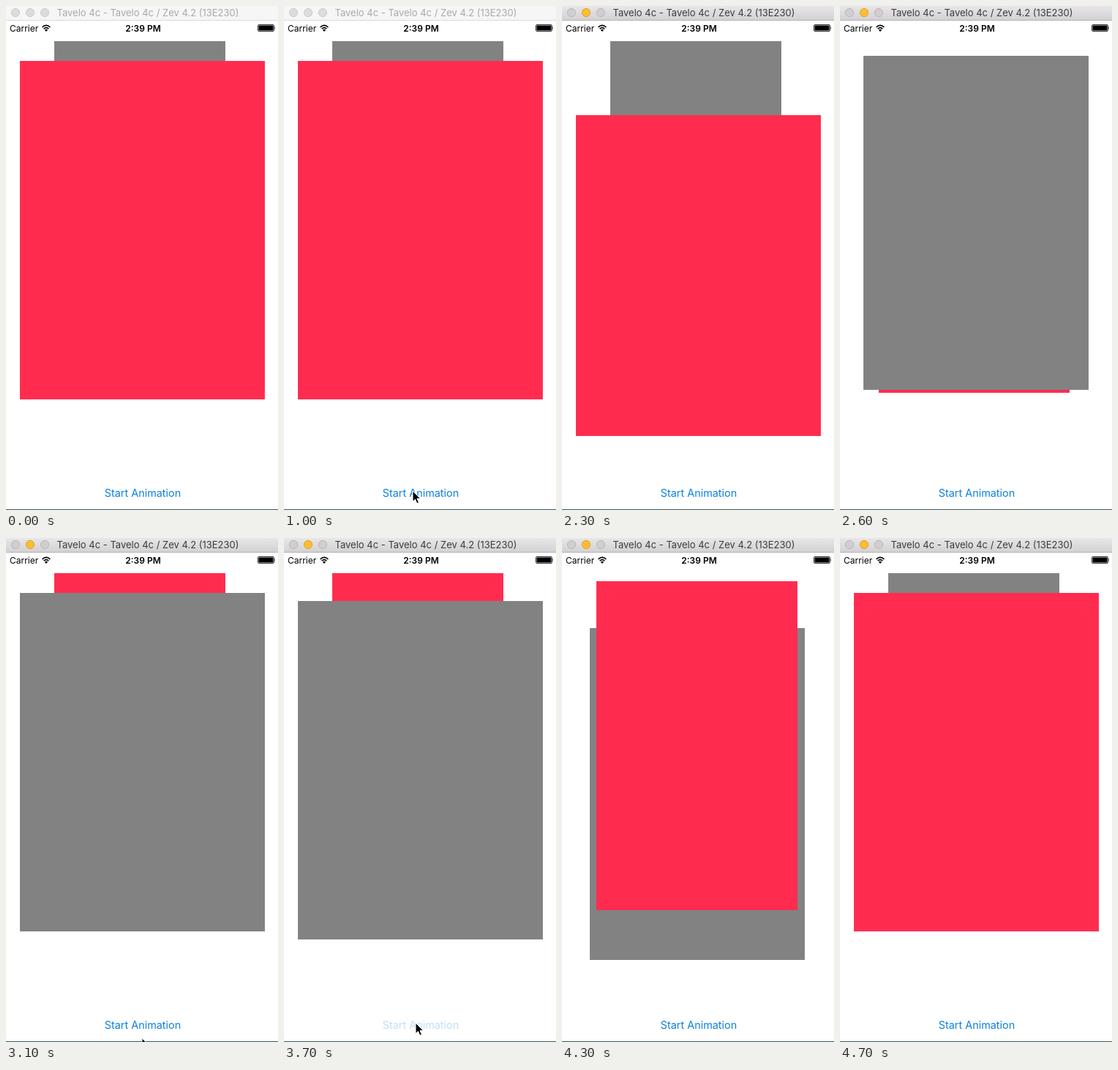
Animation, 372 px wide and 688 px high, one loop 5100 ms. Source, as an HTML page:

```html
<!DOCTYPE html>
<html lang="en">
<head>
<meta charset="utf-8">
<title>Card swap</title>
<style>
  html, body { margin: 0; width: 100%; height: 100%; overflow: hidden; background: #fff; }
  svg { display: block; width: 372px; height: 688px; font-family: Inter, Roboto, sans-serif; }
</style>
</head>
<body>
<svg viewBox="0 0 372 688">
  <defs>
    <linearGradient id="chrome" x2="0" y2="1">
      <stop stop-color="#e8e6e8"/><stop offset="1" stop-color="#d2d0d2"/>
    </linearGradient>
    <clipPath id="container"><rect y="48" width="372" height="539"/></clipPath>
  </defs>

  <rect id="bar" width="372" height="20"/>
  <rect id="barEdge" y="19" width="372" height="1"/>
  <g id="lights">
    <circle cx="13" cy="9" r="5.6"/><circle cx="33" cy="9" r="5.6"/><circle cx="53" cy="9" r="5.6"/>
  </g>
  <text id="title" x="194" y="14" font-size="13" text-anchor="middle">Tavelo 4c - Tavelo 4c / Zev 4.2 (13E230)</text>

  <text x="5" y="35" font-size="12">Carrier</text>
  <g fill="none" stroke="#000" stroke-width="1.7">
    <path d="M49.6 29Q55 23.8 60.4 29M51.7 31.2Q55 28 58.3 31.2"/>
  </g>
  <path d="M52.9 32.7Q55 30.9 57.1 32.7L55 35Z"/>
  <text x="187.5" y="34.5" font-size="12" font-weight="600" text-anchor="middle">2:39 PM</text>
  <rect x="344.5" y="25.5" width="22" height="9" rx="1.5" fill="none" stroke="#000" stroke-width=".8"/>
  <rect x="345.5" y="26.5" width="20" height="7" rx=".6"/>
  <path d="M367.5 28.2q1.6 1.8 0 3.6z"/>

  <g id="cards" clip-path="url(#container)">
    <rect id="grey" fill="#828282"/>
    <rect id="red" fill="#ff2c50"/>
  </g>

  <text id="button" x="187" y="669.5" font-size="14.4" text-anchor="middle" fill="#0a80e0">Start Animation</text>
  <rect y="687" width="372" height="1" fill="#3c5a5a"/>
  <path id="cursor" d="M0 0V14.5L3.4 11.4L5.8 17L8.4 15.9L6 10.4H10.6Z" stroke="#fff" stroke-width="1"/>
</svg>
<script>
const LOOP = 5100, STEP = 100, ACTIVATED = 1800;
const FRONT = [19, 75, 335, 462], DROPPED = [19, 174, 335, 462], BACK = [66, 48, 234, 440];

// Each run: the front card drops, then both cards trade places.
const runs = [
  { start: 2097, drop: 303, swap: 303, press: 1800, release: 2000, fade: 250,
    enter: 200, rest: 600, leave: 1950, gone: 2250, from: [162, 690], at: [176, 662] },
  { start: 3609, drop: 447, swap: 560, press: 3600, release: 3670, fade: 450,
    enter: 2900, rest: 3500, leave: 3750, gone: 4100, from: [188, 690], at: [180, 662] }
];

const $ = id => document.getElementById(id);
const set = (el, attrs) => { for (const k in attrs) el.setAttribute(k, attrs[k]); };
const ramp = (t, start, length) => Math.min(1, Math.max(0, (t - start) / length));
const ease = p => p * p * (3 - 2 * p);
const mix = (a, b, p) => a.map((v, i) => v + (b[i] - v) * p);

function place(card, box) {
  const [x, y, width, height] = box.map(Math.round);
  set(card, { x, y, width, height });
}

function drawWindow(active) {
  set($('bar'), { fill: active ? 'url(#chrome)' : '#f6f6f6' });
  set($('barEdge'), { fill: active ? '#b4b2b4' : '#dadada' });
  set($('title'), { fill: active ? '#3c3c3c' : '#a9a9a9' });
  [...$('lights').children].forEach((light, i) => {
    const lit = active && i === 1;
    set(light, {
      fill: lit ? '#fdbd30' : active ? '#d0ced0' : '#dcdcdc',
      stroke: lit ? '#dfa032' : active ? '#b9b7b9' : '#cccccc'
    });
  });
}

function drawCards(t, run, front, back) {
  const drop = ease(ramp(t, run.start, run.drop));
  const swapAt = run.start + run.drop;
  const swap = ease(ramp(t, swapAt, run.swap));
  place(front, mix(mix(FRONT, DROPPED, drop), BACK, swap));
  place(back, mix(BACK, FRONT, swap));
  $('cards').append(t >= swapAt ? back : front);
}

function drawCursor(t, run) {
  const arrive = ease(ramp(t, run.enter, run.rest - run.enter));
  const leave = ease(ramp(t, run.leave, run.gone - run.leave));
  const [x, y] = mix(mix(run.from, run.at, arrive), [run.at[0], 692], leave);
  set($('cursor'), { transform: `translate(${x} ${y})` });
}

function draw(t) {
  const second = t >= 2900;
  const run = runs[+second];
  drawWindow(t >= ACTIVATED);
  drawCards(t, run, $(second ? 'grey' : 'red'), $(second ? 'red' : 'grey'));
  drawCursor(t, run);
  const opacity = t < run.press ? 1 : 0.2 + 0.8 * ramp(t, run.release, run.fade);
  set($('button'), { opacity });
}

const begin = performance.now();
function tick() {
  const t = (performance.now() - begin) % LOOP;
  draw(Math.floor(t / STEP) * STEP);
  requestAnimationFrame(tick);
}
tick();
</script>
</body>
</html>
```
